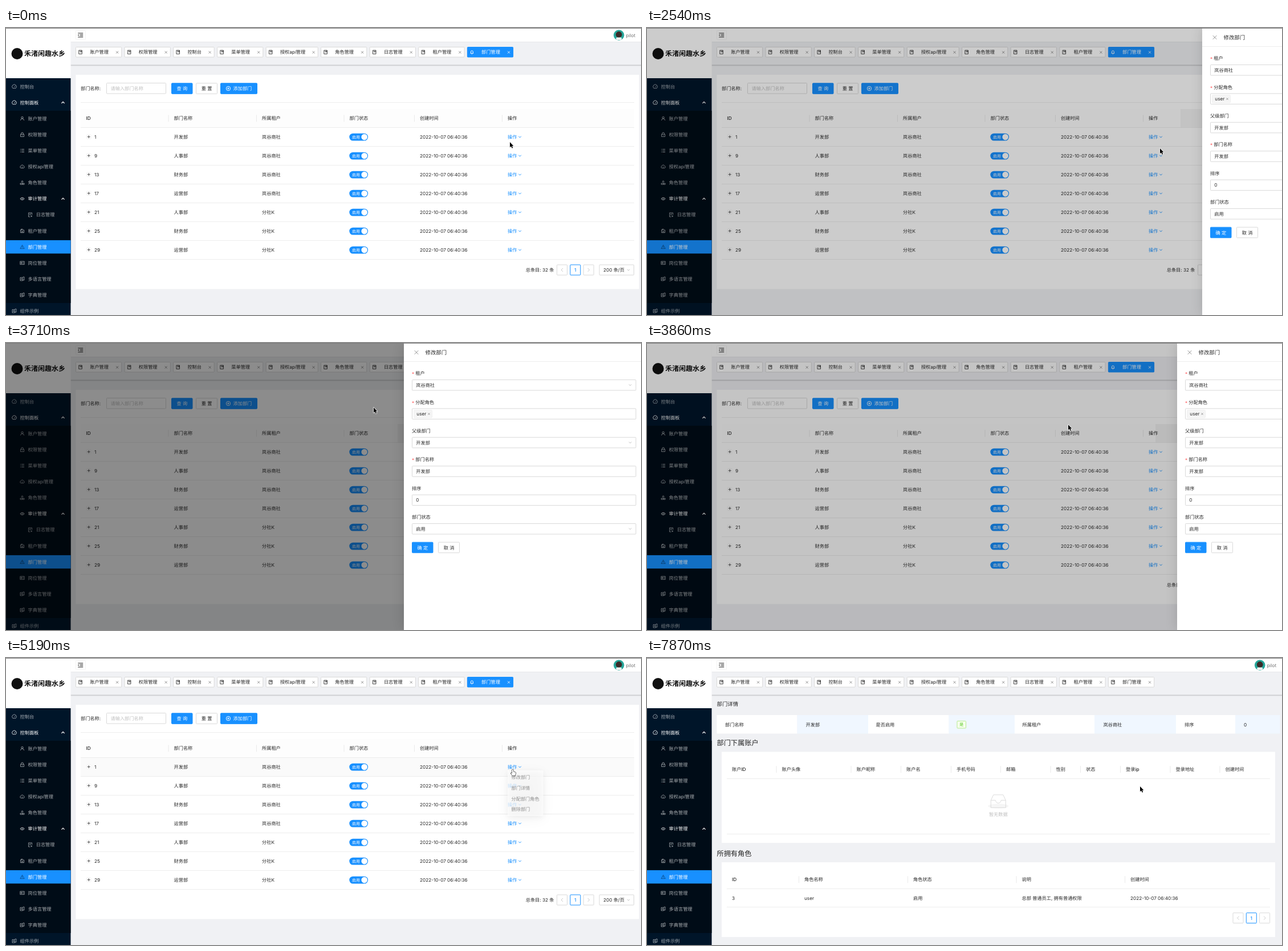
An HTML page with a canvas for the animation above (8000 ms loop, 1114 by 503 pixels).

```html
<!DOCTYPE html>
<html lang="zh">
<head>
<meta charset="utf-8">
<style>
html, body { margin: 0; width: 100%; height: 100%; overflow: hidden; background: #f0f1f4; }
canvas { display: block; }
</style>
</head>
<body>
<canvas id="stage" width="1114" height="503"></canvas>
<script>
const g = document.getElementById('stage').getContext('2d');
const W = 1114, H = 503, LOOP = 8000, TICK = 148.5;
const FONT = 'Inter, "Noto Sans CJK SC", "Noto Sans CJK", sans-serif';
const BLUE = '#1890ff', INK = 'rgba(0,0,0,.85)', LINE = '#ededed', EDGE = '#d9d9d9', PAGE = '#f0f1f4';
const TENANT = '岚谷商社', BRANCH = '分社K', USER = 'pilot', STAMP = '2022-10-07 06:40:36';

// ---------- drawing helpers ----------
function text(s, x, y, color = INK, size = 8.2, weight = 400, align = 'left') {
  g.font = `${weight} ${size}px ${FONT}`;
  g.textAlign = align;
  g.fillStyle = color;
  g.fillText(s, x, y + size * 0.37);
}
function rect(x, y, w, h, color) {
  g.fillStyle = color;
  g.fillRect(x, y, w, h);
}
function box(x, y, w, h, fill, edge, r = 1) {
  g.beginPath();
  g.roundRect(x, y, w, h, r);
  if (fill) { g.fillStyle = fill; g.fill(); }
  if (edge) { g.strokeStyle = edge; g.lineWidth = 1; g.stroke(); }
}
function disc(x, y, r, color) {
  g.beginPath();
  g.arc(x, y, r, 0, 7);
  g.fillStyle = color;
  g.fill();
}
function stroke(d, x, y, color, width = 0.9) {
  g.save();
  g.translate(x, y);
  g.strokeStyle = color;
  g.lineWidth = width;
  g.stroke(new Path2D(d));
  g.restore();
}
const hline = (x0, x1, y) => rect(x0, y - 0.5, x1 - x0, 1, LINE);
const chevron = (x, y, color, up) => stroke(up ? 'M-2.5 1.3L0-1.3L2.5 1.3' : 'M-2.2-1.2L0 1.2L2.2-1.2', x, y, color, up ? 1.2 : 0.9);
const cross = (x, y, r, color) => stroke(`M${-r} ${-r}L${r} ${r}M${r} ${-r}L${-r} ${r}`, x, y, color, 0.8);

function button(s, x, y, w, primary) {
  box(x, y, w, 18.5, primary ? BLUE : '#fff', primary ? BLUE : EDGE);
  text(s, x + w / 2, y + 9.3, primary ? '#fff' : INK, 8.2, 400, 'center');
}
function pager(x, y) {
  [0, 1, 2].forEach(i => {
    const cx = x + 9 + i * 23.3;
    box(cx - 9, y - 9, 18, 18, '#fff', i === 1 ? BLUE : EDGE);
    if (i === 1) text('1', cx, y, BLUE, 8.2, 500, 'center');
    else stroke(i ? 'M-1.5-3L1.5 0L-1.5 3' : 'M1.5-3L-1.5 0L1.5 3', cx, y, '#c4c4c4');
  });
}
function heads(list, y) {
  list.forEach(([s, x], i) => {
    text(s, x, y, INK, 8.2, 500);
    if (i) rect(x - 10, y - 6, 1, 12, '#eaeaea');
  });
}

// ---------- side menu ----------
const ICON = {
  gauge: 'M-2.6 3A3.8 3.8 0 1 1 2.6 3ZM0 1L1.8-1.2',
  user: 'M-3.2 3.2Q-2.5 0 0 0Q2.5 0 3.2 3.2M-1.7-1.7a1.7 1.7 0 1 0 3.4 0a1.7 1.7 0 1 0-3.4 0',
  lock: 'M-3-.6H3V3.5H-3ZM-1.8-.6V-2a1.8 1.8 0 0 1 3.6 0V-.6M0 1V2.2',
  list: 'M-3.5-2.5H-2.5M-1.5-2.5H3.5M-3.5 0H-2.5M-1.5 0H3.5M-3.5 2.5H-2.5M-1.5 2.5H3.5',
  cloud: 'M-2 2.5a2 2 0 0 1-.5-3.8a2.7 2.7 0 0 1 5 0A2 2 0 0 1 2 2.5ZM-1 .6H1',
  team: 'M-1.3-2a1.3 1.3 0 1 0 2.6 0a1.3 1.3 0 1 0-2.6 0M-3.5 3V1H0V3ZM1 3V1H3.5V3Z',
  eye: 'M-3.6 0Q0-4 3.6 0Q0 4-3.6 0M-1 0H1',
  doc: 'M3 0V-3.5H-3V3.5H0M-1.5-1.5H1.5M-1.5.3H.5M1 2.5H3.5M2.2 1.2V3.7',
  shop: 'M-3 3.2V-1.5H3V3.2ZM-2-1.5V-3H1M-1 3V1H1V3',
  tree: 'M0-3.3L3.6 3H-3.6ZM0-1V1.5',
  card: 'M-3.7-2.7H3.7V2.7H-3.7ZM-2.3-1H-.5V1H-2.3ZM1-1H2.6M1 1H2.6',
  lang: 'M-3.5-2.5H1V3H-3.5ZM1-3.5H3.5V2H1M-2.3 1.5L-1.2-1L-.2 1.5'
};
const MENU = [
  ['控制台', 'gauge', 0], ['控制面板', 'gauge', 0, 1], ['账户管理', 'user', 1], ['权限管理', 'lock', 1],
  ['菜单管理', 'list', 1], ['授权api管理', 'cloud', 1], ['角色管理', 'team', 1], ['审计管理', 'eye', 1, 1],
  ['日志管理', 'doc', 2], ['租户管理', 'shop', 1], ['部门管理', 'tree', 1], ['岗位管理', 'card', 1],
  ['多语言管理', 'lang', 1], ['字典管理', 'lang', 1], ['组件示例', 'lang', 0]
];
function sidebar() {
  rect(0, 0, 113.5, 88, '#fff');
  disc(19.5, 45, 10, '#111');
  text('禾渚闲趣水乡', 32, 45, '#111', 12, 700);
  rect(0, 88, 113.5, H, '#001529');
  rect(0, 145, 113.5, 337, '#000c17');
  MENU.forEach(([s, icon, depth, open], i) => {
    const y = 102.6 + i * 28.1, active = i === 10;
    if (active) rect(0, y - 11.7, 113.5, 23.4, BLUE);
    const color = active || open ? '#fff' : 'rgba(255,255,255,.65)';
    stroke(ICON[icon], 14.5 + depth * 14, y, active ? 'rgba(0,21,41,.6)' : color, 0.8);
    text(s, 24.5 + depth * 14.1, y, color, 8.2, open ? 500 : 400);
    if (open) chevron(100, y, '#fff', true);
  });
}

// ---------- header and tabs ----------
const TABS = ['账户管理', '权限管理', '控制台', '菜单管理', '授权api管理', '角色管理', '日志管理', '租户管理', '部门管理'];
function header(lastActive) {
  rect(113.5, 0, W, 24, '#fff');
  rect(113.5, 24, W, 1, '#e6e7ea');
  box(122.5, 4.5, 17, 16, null, '#f3f3f3');
  stroke('M-4.5-3.5H4.5M-1-1.2H4.5M-1 1.2H4.5M-4.5 3.5H4.5M-2.5-1.5L-4.3 0L-2.5 1.5', 130.7, 12.5, '#333', 1);
  disc(1075.2, 12.5, 9.3, '#26a69a');
  disc(1075.2, 11.5, 5.4, '#3a2a28');
  box(1070.2, 16.5, 10, 4.5, '#f2f2f2', null, 2);
  text(USER, 1087.5, 12.5, 'rgba(0,0,0,.55)');
  rect(113.5, 64, W, 1, '#dcdde0');
  rect(113.5, 65, W, 1, '#cfd0d3');
  rect(113.5, 66, W, 1, '#e3e4e7');
  let x = 122.5;
  TABS.forEach((s, i) => {
    const w = s.length === 3 ? 71.5 : s.length > 4 ? 91 : 80.2;
    const on = lastActive && i === 8;
    box(x, 33.5, w, 17.5, on ? BLUE : '#fff', on ? BLUE : EDGE);
    const color = on ? '#fff' : '#333';
    stroke(on ? 'M-2.7 2H2.7M-2 2V-.5a2 2 0 0 1 4 0V2M-.6 3.5H.6' : 'M-2.8-3.2H2.8V3.2H-2.8ZM-.5-3V0L.7-1L1.9 0V-3', x + 8, 42.3, color);
    text(s, x + 24.7, 42.3, on ? '#fff' : INK);
    cross(x + w - 7.6, 42.6, 2, on ? '#fff' : '#777');
    x += w + 5.4;
  });
}

// ---------- department list ----------
const ROWS = [[1, '开发部'], [9, '人事部'], [13, '财务部'], [17, '运营部'], [21, '人事部'], [25, '财务部'], [29, '运营部']];
function listPage(hover) {
  rect(122.5, 82, 988, 375.5, '#fff');
  text('部门名称:', 131, 106);
  box(176.5, 96.5, 104, 18.5, '#fff', EDGE);
  text('请输入部门名称', 183.5, 106, '#bfbfbf');
  button('查 询', 290.5, 96.8, 36.5, true);
  button('重 置', 333.5, 96.8, 37, false);
  box(376.5, 96.8, 64, 18.5, BLUE, BLUE);
  stroke('M-3.7 0a3.7 3.7 0 1 0 7.4 0a3.7 3.7 0 1 0-7.4 0M-1.9 0H1.9M0-1.9V1.9', 390, 106, '#fff');
  text('添加部门', 398.5, 106, '#fff');
  hline(131, 1102, 130.5);
  rect(131, 142, 971, 32, '#fdfdfd');
  heads([['ID', 140.5], ['部门名称', 294.5], ['所属租户', 449], ['部门状态', 602.5], ['创建时间', 726], ['操作', 880]], 158.3);
  hline(131, 1102, 174.5);
  ROWS.forEach(([id, name], i) => {
    const y = 190.9 + i * 33;
    if (hover && !i) rect(131, 175, 971, 32, '#fafafa');
    box(141.5, y - 4, 7.5, 7.5, '#fff', '#f3f3f3');
    stroke('M-2.5 0H2.5M0-2.5V2.5', 145.2, y - 0.2, '#444');
    text(id, 155, y);
    text(name, 294.5, y);
    text(i < 4 ? TENANT : BRANCH, 449, y);
    box(602.3, y - 6.2, 32.8, 12.8, BLUE, null, 6.4);
    text('启用', 607, y + 0.2, '#fff', 7);
    disc(628.7, y + 0.2, 5.3, '#fff');
    text(STAMP, 726, y);
    text('操作', 880, y, BLUE);
    chevron(901.5, y, BLUE);
    hline(131, 1102, y + 16.6);
  });
  text('总条目: 32 条', 911.7, 424);
  pager(966.5, 424);
  box(1041, 415, 60.5, 18, '#fff', EDGE);
  text('200 条/页', 1048, 424);
  chevron(1092, 424, '#c0c0c0');
}

const ACTIONS = ['修改部门', '部门详情', '分配部门角色', '删除部门'];
function dropdown(alpha, cursorY) {
  if (alpha <= 0) return;
  g.save();
  g.globalAlpha = alpha;
  [[24, 5, 0.09], [10, 2, 0.1]].forEach(([blur, dy, a]) => {
    g.shadowColor = `rgba(0,0,0,${a})`;
    g.shadowBlur = blur;
    g.shadowOffsetY = dy;
    box(880, 197, 62.5, 80, '#fff');
  });
  g.shadowColor = 'transparent';
  ACTIONS.forEach((s, i) => {
    const y = 209 + i * 18.75;
    if (Math.abs(cursorY + 2 - y) < 9.4) rect(880, y - 9.4, 62.5, 18.75, '#f5f5f5');
    text(s, 886.5, y);
  });
  g.restore();
}

// ---------- edit drawer ----------
const FIELDS = [['租户', TENANT, 1, 1], ['分配角色', '', 1, 0], ['父级部门', '开发部', 0, 1],
  ['部门名称', '开发部', 1, 0], ['排序', '0', 0, 0], ['部门状态', '启用', 0, 1]];
function drawer(x, shade) {
  if (shade <= 0) return;
  rect(0, 0, W, H, `rgba(0,0,0,${shade})`);
  const gap = x <= 698 ? 11 : x < W ? 38 : 26;
  rect(x - gap, 142, Math.min(gap, 1102 - x + gap), 32, 'rgba(0,0,0,.04)');
  g.save();
  g.shadowColor = 'rgba(0,0,0,.14)';
  g.shadowBlur = 20;
  rect(x, 0, 420, H, '#fff');
  g.restore();
  if (x >= W) return;
  cross(x + 22, 16.5, 3.3, '#777');
  text('修改部门', x + 37.5, 16.5, INK, 9.4, 500);
  hline(x, W, 32.5);
  FIELDS.forEach(([label, value, required, select], i) => {
    const y = 53.2 + i * 50.4;
    if (required) text('*', x + 14, y + 1, '#ff4d4f');
    text(label, x + (required ? 20.3 : 14), y);
    box(x + 14.5, y + 11.3, 392.5, 18.5, '#fff', EDGE);
    text(value, x + 21.3, y + 20.6);
    if (select) chevron(x + 397, y + 20.4, '#bbb');
  });
  box(x + 17.5, 117.5, 32, 13.5, '#f5f5f5', '#f0f0f0');
  text('user', x + 22.3, 124.3);
  cross(x + 44, 124.3, 1.7, '#888');
  button('确 定', x + 14.5, 349.2, 36.5, true);
  button('取 消', x + 60.5, 349.2, 37, false);
}

// ---------- department details ----------
const FACTS = [['部门名称', 122.5, 137], ['开发部', 263.5, 278.5], ['是否启用', 388, 401.5], ['', 529.5, 0],
  ['所属租户', 645, 658.5], [TENANT, 785, 800.5], ['排序', 928, 943], ['0', 1032, 1047]];
function detailPage() {
  text('部门详情', 122.5, 80.5, INK, 9.4, 500);
  FACTS.forEach(([s, x, tx], i) => {
    rect(x, 100, (FACTS[i + 1] || [0, 1110.5])[1] - x, 32.5, i % 2 ? '#f0f7ff' : '#fff');
    text(s, tx, 116.8);
  });
  box(544, 110.5, 15.5, 12.5, '#f6ffed', '#b7eb8f');
  text('是', 551.8, 116.8, '#52c41a', 7, 400, 'center');

  text('部门下属账户', 122.5, 148.7, INK, 12.2, 500);
  rect(131, 164.5, 971, 159.5, '#fff');
  heads([['账户ID', 149], ['账户头像', 236.5], ['账户昵称', 367.5], ['账户名', 455], ['手机号码', 543], ['邮箱', 630],
    ['性别', 717.5], ['状态', 770], ['登录ip', 840], ['登录地址', 927.5], ['创建时间', 1014.5]], 195.2);
  hline(140, 1093, 211.5);
  g.beginPath();
  g.ellipse(616.3, 259.5, 18, 4, 0, 0, 7);
  g.fillStyle = '#f5f5f5';
  g.fill();
  stroke('M-13-2L-8.5-11.5H8.5L13-2V11H-13ZM-13-2H-5Q-4 3 0 3Q4 3 5-2H13', 616.3, 251.3, '#d9d9d9');
  text('暂无数据', 616.3, 274.2, 'rgba(0,0,0,.25)', 8.2, 400, 'center');
  hline(140, 1093, 308.5);

  text('所拥有角色', 122.5, 342.5, INK, 12.2, 500);
  rect(131, 358, 971, 131, '#fff');
  const cols = [['ID', 149], ['角色名称', 276], ['角色状态', 467], ['说明', 657.5], ['创建时间', 848]];
  heads(cols, 388.3);
  hline(140, 1093, 404.5);
  ['3', 'user', '启用', '总部 普通员工, 拥有普通权限', STAMP].forEach((s, i) => text(s, cols[i][1], 420.6));
  hline(140, 1093, 436.5);
  pager(1028, 455.7);
}

const POINTER = [[0, 884, 200], [3, 889, 191], [5, 894, 199], [8, 903, 223], [9, 903, 223], [11, 904, 210.5], [13, 904, 210.5],
  [14, 900, 211], [18, 900, 211], [21, 690, 135], [25, 645, 113], [27, 833, 173.5], [29, 860, 184], [33, 886, 187],
  [34, 886, 187], [39, 902, 228], [40, 902, 228], [42, 905, 228.5], [49, 905, 228.5], [50, 901, 229], [52, 901, 229], [53, 865, 225]];
const POPUP = [[3, 0], [5, 1], [13, 1], [15, 0], [34, 0], [36, 1], [49, 1], [50, 0]];
const PANEL = [[14, 1114], [15, 1114], [16, 1075], [17, 974], [18, 790], [19, 712], [20, 698], [25, 698], [26, 930], [27, 1114]];
const SHADE = [[14, 0], [17, 0.2], [20, 0.45], [25, 0.45], [27, 0.012], [28, 0]];

function track(keys, n) {
  const i = keys.findIndex(k => k[0] > n);
  if (i < 0) return keys[keys.length - 1].slice(1);
  if (!i) return keys[0].slice(1);
  const a = keys[i - 1], b = keys[i], p = (n - a[0]) / (b[0] - a[0]);
  return a.slice(1).map((v, j) => v + (b[j + 1] - v) * p);
}

const ARROW = new Path2D('M0 0V9.2L2.1 7.2L3.7 10.7L5.2 10L3.7 6.7H6.4Z');
const HAND = new Path2D('M-1.2 1a1 1 0 0 1 2 0V4L4 4.8Q5.2 5.3 4.9 7L4 10.8H-.8L-3.6 7Q-3.6 5.4-1.2 6.8Z');
function pointer(x, y, hand) {
  g.save();
  g.translate(x, y);
  g.lineJoin = 'round';
  g.lineWidth = hand ? 1.1 : 1.4;
  g.fillStyle = hand ? '#fff' : '#000';
  g.strokeStyle = hand ? '#000' : '#fff';
  g.stroke(hand ? HAND : ARROW);
  g.fill(hand ? HAND : ARROW);
  g.restore();
}

function draw(ms) {
  const n = Math.floor((ms % LOOP + 12) / TICK);
  const [x, y] = track(POINTER, n);
  const hand = (n >= 3 && n < 14) || (n >= 33 && n < 50);
  const detail = n >= 50;
  g.textRendering = 'geometricPrecision';
  rect(0, 0, W, H, PAGE);
  header(!detail);
  if (detail) detailPage();
  else listPage(hand);
  sidebar();
  dropdown(track(POPUP, n)[0], y);
  drawer(track(PANEL, n)[0], track(SHADE, n)[0]);
  rect(0, 0, W, 1, '#7a7a7a');
  pointer(x, y, hand);
}

const start = performance.now();
function loop() {
  draw(performance.now() - start);
  requestAnimationFrame(loop);
}
loop();
</script>
</body>
</html>
```
